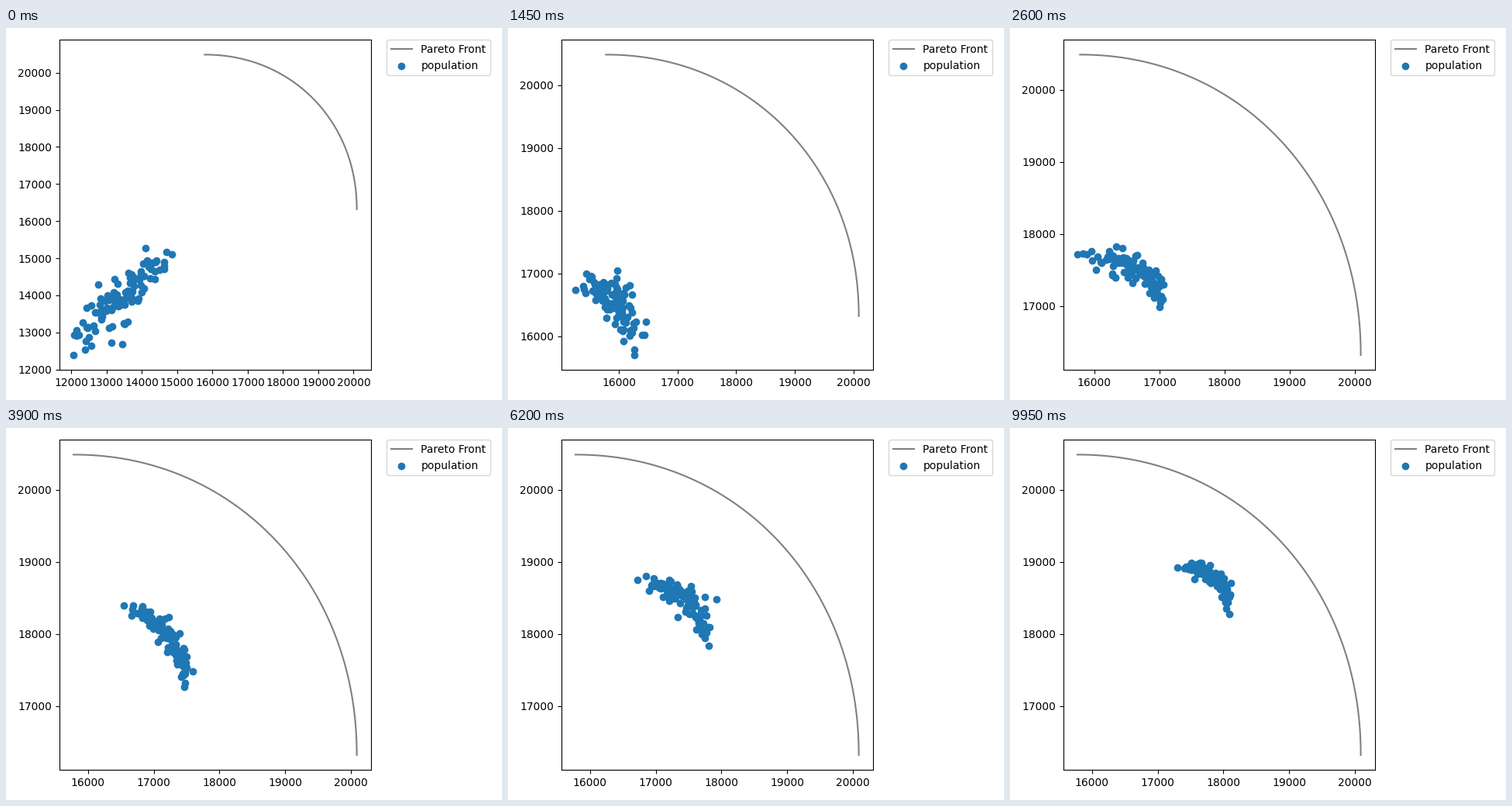
A matplotlib script for the animation above (10000 ms loop, 640 px wide and 480 px high).

```python
import numpy as np
import matplotlib.pyplot as plt
from matplotlib.animation import FuncAnimation

SIZE = 100     # individuals
STEPS = 200    # generations in one loop
PACE = 40      # generations per e-fold of progress
BULGE = 2.06   # superellipse exponent of the front

# Milestones: the cloud follows a curve (start, bend, end) of some width,
# all in thousands.
STAGES = np.array([0, 29, 52, 78, 124, 158, 199])
WIDTHS = [0.25, 0.13, 0.08, 0.06, 0.065, 0.045, 0.04]
SPINES = np.array([
    [(12.06, 12.39), (13.40, 14.20), (14.86, 15.10)],
    [(15.26, 16.74), (16.10, 16.98), (16.27, 15.70)],
    [(15.74, 17.72), (16.99, 17.65), (17.00, 16.99)],
    [(16.54, 18.40), (17.50, 18.07), (17.47, 17.27)],
    [(16.72, 18.75), (17.64, 18.67), (17.81, 17.84)],
    [(17.23, 18.86), (17.87, 18.71), (17.92, 18.13)],
    [(17.30, 18.92), (18.01, 18.96), (18.09, 18.28)],
])

rng = np.random.default_rng(7)


def progress(gen):
    return 1 - np.exp(-gen / PACE)


def at(gen, values):
    """Blend milestone values, quick at first and slow later."""
    return np.interp(progress(gen), progress(STAGES), values)


def spawn(u, gen):
    """New individual at share u along the curve of a generation."""
    start, bend, end = (
        np.array([at(gen, SPINES[:, k, axis]) for axis in (0, 1)])
        for k in range(3))
    base = (1 - u)**2 * start + 2 * u * (1 - u) * bend + u**2 * end
    spread = at(gen, WIDTHS) * 2 * np.sqrt(u * (1 - u))
    place = base + spread * rng.standard_t(5, 2)
    return 1000 * np.maximum(place, np.minimum(start, end))


def evolve():
    """Each individual stays put until a fitter one replaces it."""
    shares = rng.beta(2, 2, SIZE)
    shares[:2] = 0, 1
    pop = np.empty((STEPS, SIZE, 2))
    for i, u in enumerate(shares):
        gen = 0
        while gen < STEPS:
            end = min(gen + rng.integers(1, min(3 + gen // 8, 15)), STEPS)
            when = next((s for s in STAGES if gen <= s < end),
                        (gen + end - 1) / 2)
            pop[gen:end, i] = spawn(u, when)
            gen = end
    return pop


population = evolve()
angle = np.linspace(np.pi / 2, 0, 90)
front = np.column_stack([
    15779 + 4312 * np.abs(np.cos(angle))**(2 / BULGE),
    16320 + 4168 * np.abs(np.sin(angle))**(2 / BULGE)])

fig, ax = plt.subplots(figsize=(6.4, 4.8), dpi=100)
ax.plot(*front.T, color="gray", label="Pareto Front")
dots = ax.scatter(*population[0].T, color="C0", label="population")
ax.legend(bbox_to_anchor=(1.05, 1), loc="upper left", borderaxespad=0)


def update(gen):
    pts = population[gen]
    dots.set_offsets(pts)
    seen = np.vstack([pts, front])
    low, high = seen.min(axis=0), seen.max(axis=0)
    pad = 0.05 * (high - low)
    ax.set_xlim(low[0] - pad[0], high[0] + pad[0])
    ax.set_ylim(low[1] - pad[1], high[1] + pad[1])
    return [dots]


# The legend hangs off the axes, so the layout needs a few passes to settle.
update(0)
for _ in range(4):
    fig.tight_layout()

anim = FuncAnimation(fig, update, frames=STEPS, interval=50, repeat=True)
plt.show()
```
